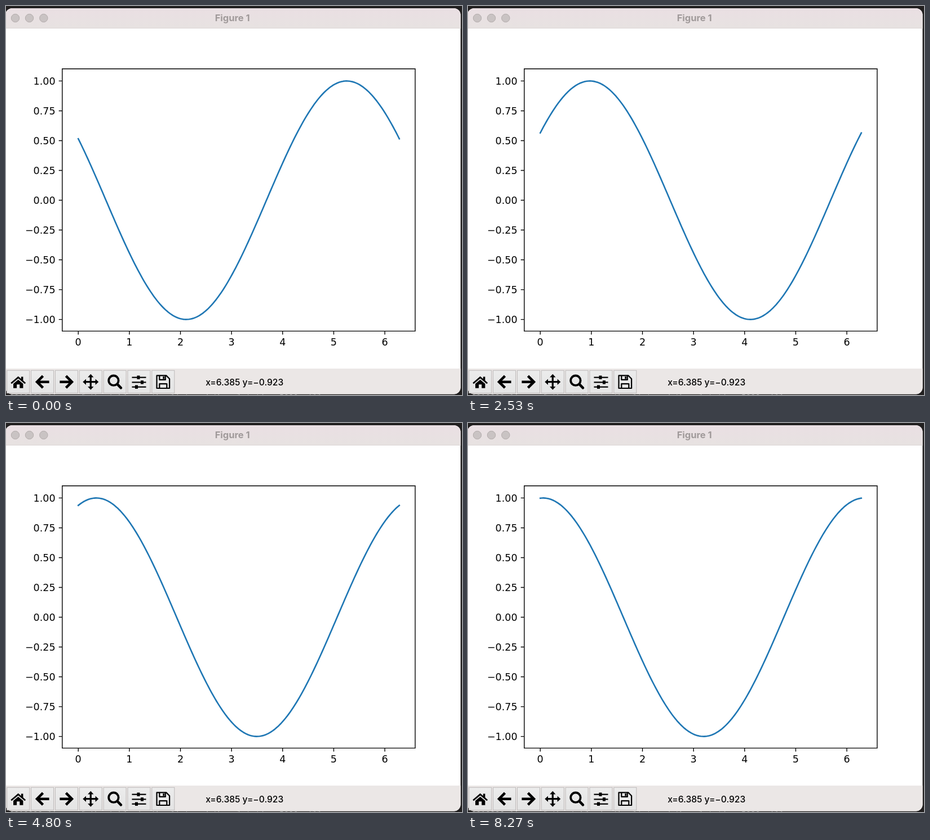
Recreate the animation shown at these times as an HTML page. Size 809 by 692 pixels, loop 8.34 s.

```html
<!DOCTYPE html>
<html lang="en">
<head>
<meta charset="utf-8">
<title>Figure 1</title>
<style>
  html, body { margin: 0; width: 100%; height: 100%; overflow: hidden; background: #211f1f; }
  svg { display: block; width: 809px; height: 692px; }
  .ui { font-family: Inter, Roboto, sans-serif; text-anchor: middle; }
  .labels { font: 17.53px "DejaVu Sans", sans-serif; }
  .line { fill: none; stroke: #000; }
</style>
</head>
<body>
<svg viewBox="0 0 809 692">
  <defs>
    <linearGradient id="bar" x2="0" y2="1">
      <stop stop-color="#eadfe3"/><stop offset="1" stop-color="#e7e2e1"/>
    </linearGradient>
    <linearGradient id="key" x2="0" y2="1">
      <stop stop-color="#ececec"/><stop offset="1" stop-color="#e4e4e4"/>
    </linearGradient>
    <clipPath id="win"><rect x="-1" y="4" width="807.5" height="686.5" rx="12"/></clipPath>
  </defs>
  <rect width="809" height="692" fill="#211f1f"/>
  <text x="6" y="701" font-family="'Noto Sans Mono', monospace" font-size="14" fill="#777">0010000 lines of the table in the list and the plot time 5000 will run</text>
  <g clip-path="url(#win)">
    <rect width="807" height="692" fill="#fff"/>
    <rect y="4" width="807" height="36" fill="url(#bar)"/>
    <rect y="39" width="807" height="1" fill="#dcd6d5"/>
    <g fill="#c9c3c3" stroke="#b2abab">
      <circle cx="16.5" cy="21.5" r="7.2"/>
      <circle cx="41.5" cy="21.5" r="7.2"/>
      <circle cx="66.8" cy="21.5" r="7.2"/>
    </g>
    <text class="ui" x="401.7" y="26.7" font-size="16.5" font-weight="700" fill="#a09a9a">Figure 1</text>
    <rect y="645" width="807" height="46" fill="#ebe7e6"/>
    <text class="ui" x="423.2" y="674.7" font-size="15.6" font-weight="500">x=6.385 y=−0.923</text>
  </g>
  <g id="tools"></g>
  <g id="axes" class="labels"></g>
  <path id="curve" fill="none" stroke="#1f77b4" stroke-width="2.63" stroke-linejoin="round" stroke-linecap="square"/>
</svg>
<script>
const $ = id => document.getElementById(id);
const X = x => 128.2 + x * 90.65;
const Y = y => 345.5 - y * 212.1;

// Toolbar icons, centred on their buttons
const arrow = '<path class="line" stroke-width="4.6" d="M1-10.5L-9.5 0L1 10.5M-9 0H12"/>';
const slider = (y, knob) =>
  `<path class="line" stroke-width="2.2" d="M-12.5 ${y}H12.5"/><rect x="${knob - 2.5}" y="${y - 3.2}" width="5" height="6.4"/>`;
const icons = [
  `<path class="line" stroke-width="2.8" d="M-12.5 2.5L0-8L12.5 2.5"/>
   <path d="M-8.7 3.2L0-4L8.7 3.2V11H2.6V4.5H-2.6V11H-8.7ZM5.2-9.2H8.7V-1L5.2-4Z"/>`,
  arrow,
  `<g transform="scale(-1 1)">${arrow}</g>`,
  '<path class="line" stroke-width="3.2" d="M-10 0H10M0-10V10"/>' +
    [0, 90, 180, 270].map(a => `<path transform="rotate(${a})" d="M0-14L5.2-8.3H-5.2Z"/>`).join(''),
  `<circle class="line" cx="-2.2" cy="-2.5" r="8.7" stroke-width="3.8"/>
   <path class="line" stroke-width="4.6" stroke-linecap="round" d="M5 4.7L10.8 10.7"/>`,
  slider(-8, -1) + slider(.7, 5.5) + slider(9, -4.5),
  `<path class="line" stroke-width="2.2" stroke-linejoin="round" d="M-11.3-11.3H5.5L11.3-5.5V11.3H-11.3ZM-6.5 11V3.5H6.5V11M-6.5-11V-3.8H4V-11"/>
   <path d="M-.5-9.6H2.4V-5.2H-.5Z"/>`
];
$('tools').innerHTML = icons.map((icon, i) => {
  const x = 21.7 + i * 42.85;
  return `<g transform="translate(${x} 668.7)">
    <rect x="-20" y="-20.4" width="40" height="40.4" fill="url(#key)" stroke="#bdbaba"/>${icon}</g>`;
}).join('');

// Axes, ticks and labels
const [left, top_, right, bottom] = [99.8, 111.8, 725.9, 578.4];
let axes = '', ticks = '';
for (let x = 0; x <= 6; x++) {
  ticks += `M${X(x)} ${bottom}v6.1`;
  axes += `<text x="${X(x)}" y="604.4" text-anchor="middle">${x}</text>`;
}
for (let i = -4; i <= 4; i++) {
  const y = i / 4;
  ticks += `M${left} ${Y(y)}h-6.1`;
  axes += `<text x="87.6" y="${Y(y) + 6.6}" text-anchor="end">${y.toFixed(2).replace('-', '−')}</text>`;
}
$('axes').innerHTML = axes +
  `<path class="line" stroke-width="1.4" d="M${left} ${top_}H${right}V${bottom}H${left}Z${ticks}"/>`;

// The phase grows 0.1 per plot update and restarts after 100 updates.
// Pairs: picture step, updates so far (the plot's timer is slightly uneven).
const pace = [[0, 26], [22, 74], [38, 106], [58, 147], [72, 175], [91, 212], [124, 278]];

function updates(step) {
  const i = Math.max(1, pace.findIndex(p => p[0] >= step));
  const [a, n] = pace[i - 1], [b, m] = pace[i];
  return Math.round(n + (m - n) * (step - a) / (b - a));
}

function draw(ms) {
  const t = Math.floor(ms % 8340 / 10) * 10;
  const step = Math.min(124, Math.floor((t + 5) * 3 / 200));
  const phase = updates(step) % 100 / 10;
  const points = [];
  for (let i = 0; i <= 200; i++) {
    const x = i * Math.PI / 100;
    points.push(X(x).toFixed(2) + ' ' + Y(Math.sin(x + phase)).toFixed(2));
  }
  $('curve').setAttribute('d', 'M' + points.join('L'));
}

const start = performance.now();
function loop() {
  draw(performance.now() - start);
  requestAnimationFrame(loop);
}
loop();
</script>
</body>
</html>
```
